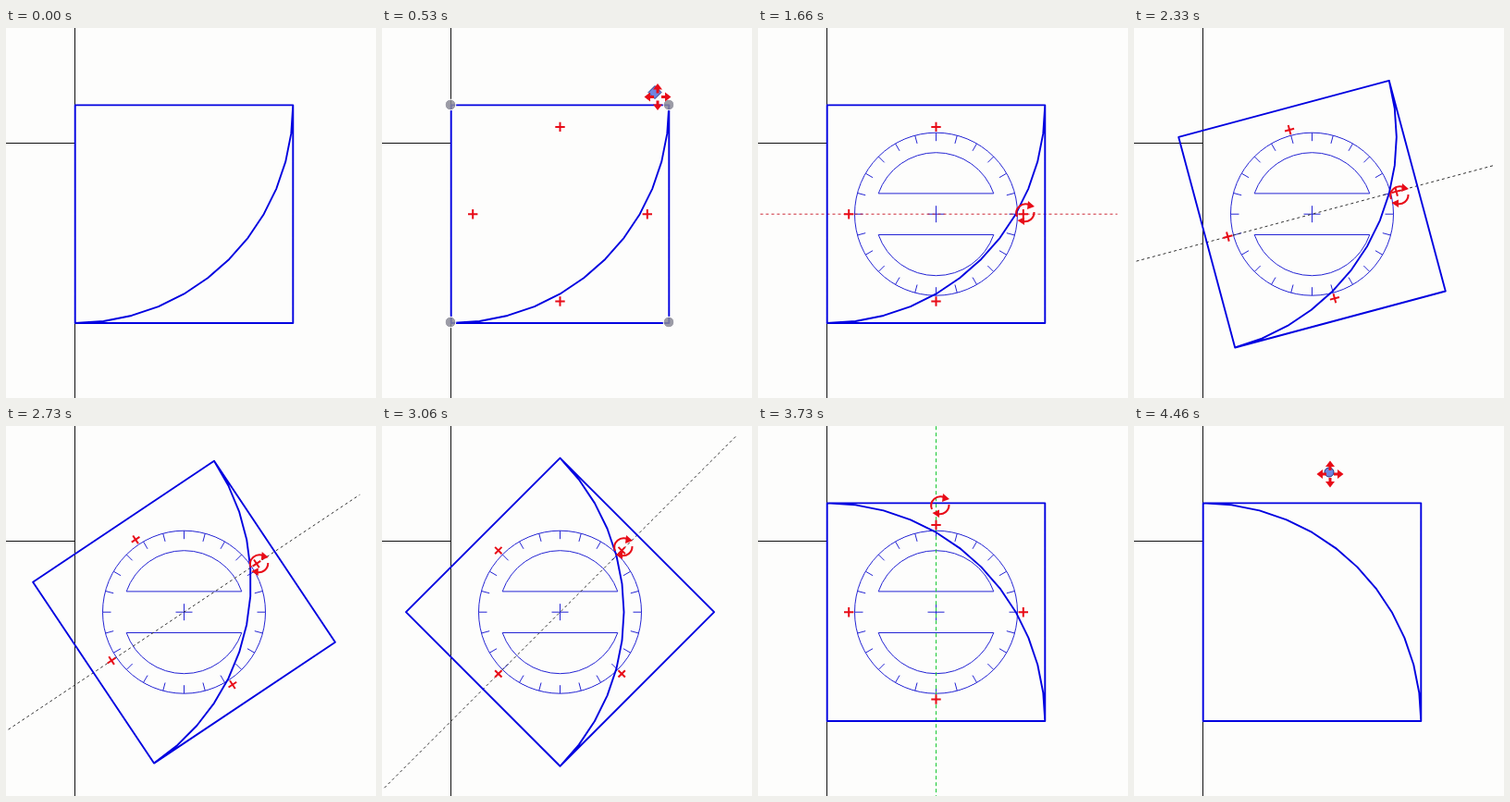
Write an HTML page that moves like this. It is 400 px wide and 400 px high and loops after 4530 ms.

```html
<!DOCTYPE html>
<html lang="en">
<head>
<meta charset="utf-8">
<title>Rotating a square with a protractor</title>
<style>
html, body { margin: 0; width: 100%; height: 100%; overflow: hidden; background: #fdfdfc; }
svg { display: block; width: 100vw; height: 100vh; }
.blue { fill: none; stroke: #0000e0; stroke-width: 1.9; stroke-linejoin: round; }
.thin { fill: none; stroke: #2424d4; stroke-width: 1; }
.red { fill: none; stroke: #e80c18; stroke-width: 2; }
.head { fill: #e80c18; }
</style>
</head>
<body>
<svg viewBox="0 0 400 400">
  <path d="M74.5 0V400M0 124.5H74" fill="none" stroke="#111"/>
  <g id="protractor" class="thin">
    <circle cx="192.5" cy="201.2" r="88"/>
    <path id="scale"/>
  </g>
  <path id="guide" fill="none"/>
  <g id="shape">
    <path id="outline" class="blue"/>
    <path id="marks" class="red"/>
  </g>
  <g id="grips" fill="#8b8b96" fill-opacity=".85" stroke="#fdfdfc"></g>
  <g id="moveCursor">
    <path id="badge" fill="#6f86e0" stroke="#223380"/>
    <g id="arrows"></g>
  </g>
  <g id="turnCursor">
    <path class="red" stroke-width="1.8" d="M-9 4A10 10 0 0 1 5 -8.5M9.5 -1A10 10 0 0 1 -3 9"/>
    <path class="head" d="M3 -13L10 -7L2 -4ZM-1 4.500L-8.500 8L-1 13Z"/>
  </g>
</svg>
<script>
const LOOP = 4530, TICKS = 68, CX = 192.5, CY = 201.2, HALF = 117.8, GRIP = 94.3;
const $ = id => document.getElementById(id);
const rad = deg => deg * Math.PI / 180;
const show = (id, on) => $(id).setAttribute('display', on ? 'inline' : 'none');
const range = n => [...Array(n).keys()];

// Each row: tick, then the values to interpolate.
const ANGLE = [[28, 0], [35, 15], [36, 15], [44, 45], [46, 45], [52, 77], [56, 90]];
const CURSOR = [
  [2, 382, 18], [9, 284, 84], [15, 277, 152], [18, 289, 200], [28, 289, 200],
  [35, 287, 181], [36, 287, 180], [40, 278, 155], [44, 261, 131], [46, 261, 131],
  [52, 217, 97], [56, 197, 86], [61, 197, 86], [67, 212, 52]
];

function sample(keys, tick) {
  if (tick <= keys[0][0]) return keys[0].slice(1);
  const i = keys.findIndex(key => key[0] >= tick);
  if (i < 0) return keys[keys.length - 1].slice(1);
  const a = keys[i - 1], b = keys[i], p = (tick - a[0]) / (b[0] - a[0]);
  return a.slice(1).map((v, n) => v + (b[n + 1] - v) * p);
}

function build() {
  const left = CX - HALF, top = CY - HALF, size = HALF * 2;
  const arc = range(13).map(i => {
    const a = rad(i * 7.5);
    return `${left + size * Math.cos(a)} ${top + size * Math.sin(a)}`;
  });
  $('outline').setAttribute('d', `M${left} ${top}h${size}v${size}h${-size}zM${arc.join('L')}`);

  const polar = (r, a) => `${CX + r * Math.cos(a)} ${CY + r * Math.sin(a)}`;
  const ticks = range(24).map(i => `M${polar(88, rad(i * 15))}L${polar(79, rad(i * 15))}`).join('');
  const windows = [-1, 1].map(s => {
    const y = CY + s * 22.3;
    return `M${CX - 62.3} ${y}A66 66 0 0 ${s < 0 ? 1 : 0} ${CX + 62.3} ${y}Z`;
  }).join('');
  $('scale').setAttribute('d', `${ticks}${windows}M${CX - 9} ${CY}h18M${CX} ${CY - 9}v18`);

  $('marks').setAttribute('d', range(4).map(i => {
    const x = CX + GRIP * Math.cos(rad(i * 90)), y = CY + GRIP * Math.sin(rad(i * 90));
    return `M${x - 5.2} ${y}h10.4M${x} ${y - 5.2}v10.4`;
  }).join(''));

  $('grips').innerHTML = [74, 310].flatMap(x => [83, 318].map(y =>
    `<circle cx="${x}" cy="${y}" r="5.8"/>`)).join('');
  $('arrows').innerHTML = range(4).map(i =>
    `<path class="head" transform="rotate(${i * 90})" d="M14.500 0L8 -5V-1.500H4V1.500H8V5Z"/>`).join('');
}

function drawGuide(angle) {
  const dx = Math.cos(rad(angle)), dy = Math.sin(rad(angle));
  const reach = Math.min(190 / Math.max(dx, 1e-6), 202 / Math.max(dy, 1e-6)) + (angle < 20 ? 6 : 0);
  const guide = $('guide');
  guide.setAttribute('d',
    `M${CX - dx * reach} ${CY + dy * reach}L${CX + dx * reach} ${CY - dy * reach}`);
  guide.setAttribute('stroke', angle === 0 ? '#cc2936' : angle === 90 ? '#18c832' : '#333');
  guide.setAttribute('stroke-dasharray', angle === 90 ? '4 3' : '3 3');
}

function draw(ms) {
  const tick = Math.floor((ms % LOOP + 6) / (LOOP / TICKS)) % TICKS;
  const [angle] = sample(ANGLE, tick);
  const [x, y] = sample(CURSOR, tick);
  const turning = tick >= 18 && tick < 60;
  const hovering = (tick >= 8 && tick < 18) || (tick >= 60 && tick < 64);

  $('shape').setAttribute('transform', `rotate(${-angle} ${CX} ${CY})`);
  drawGuide(angle);
  show('protractor', turning);
  show('guide', tick >= 22 && tick < 60);
  show('marks', turning || hovering);
  show('grips', hovering);
  show('turnCursor', turning);
  show('moveCursor', tick >= 2 && !turning);
  $('badge').setAttribute('d', hovering
    ? 'M-10 -5L-3 -12L4 -5L-3 2Z'
    : 'M-6 -2A5 5 0 1 1 4 -2A5 5 0 1 1 -6 -2Z');
  for (const id of ['turnCursor', 'moveCursor']) {
    $(id).setAttribute('transform', `translate(${x} ${y})`);
  }
}

build();
const start = performance.now();
function loop() {
  draw(performance.now() - start);
  requestAnimationFrame(loop);
}
loop();
</script>
</body>
</html>
```
